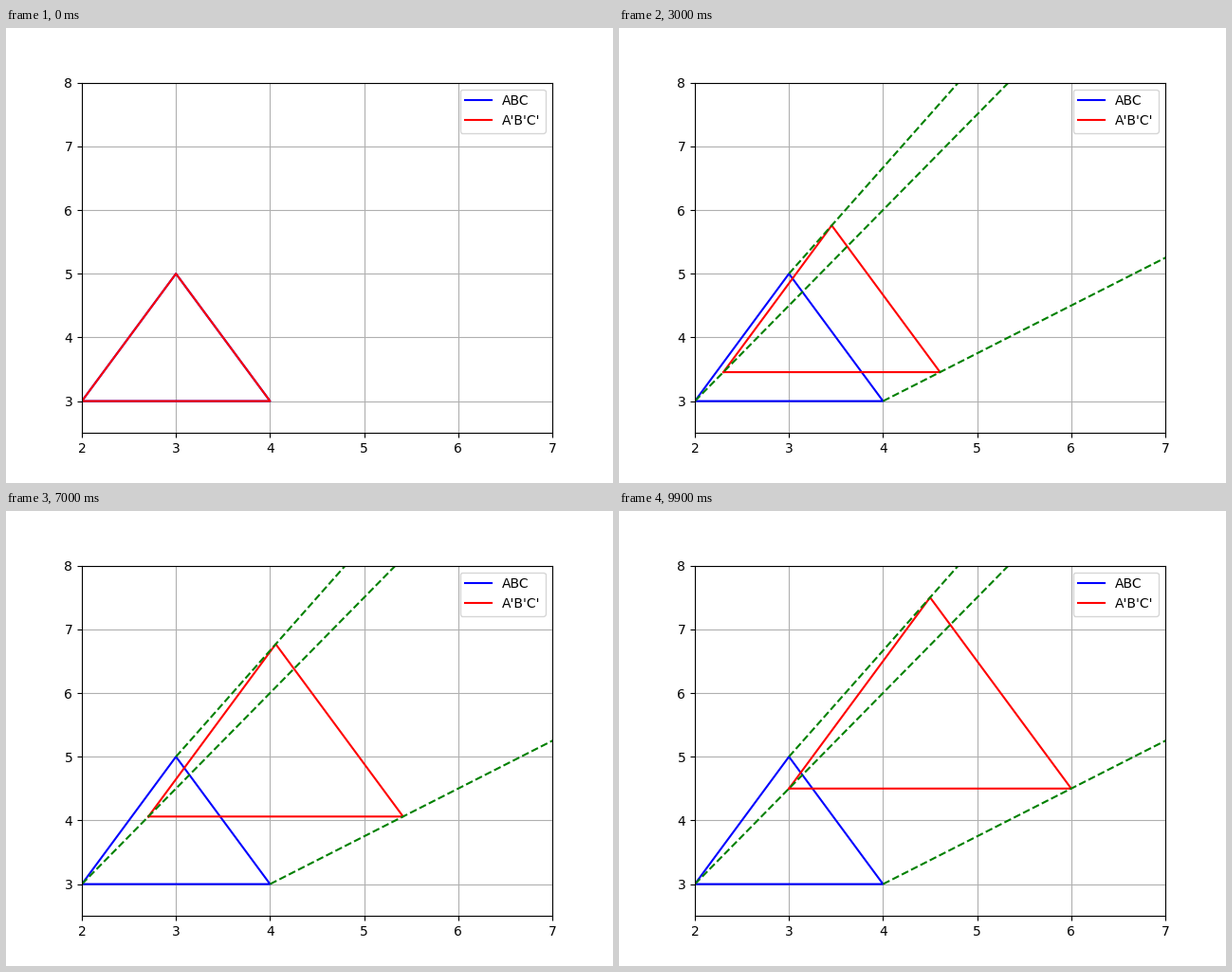
Write a matplotlib script that moves like this. It is 640x480 px and loops after 10000 ms.

```python
import numpy as np
import matplotlib.pyplot as plt
from matplotlib.animation import FuncAnimation

FRAMES = 100
INTERVAL = 100
MAX_SCALE = 1.5
RAY_REACH = 11  # ray length in units of a vertex's displacement

triangle = np.array([[2, 3], [3, 5], [4, 3]], dtype=float)
scales = np.linspace(1, MAX_SCALE, FRAMES)


def closed(points):
    return np.vstack([points, points[:1]]).T


fig, ax = plt.subplots(figsize=(6.4, 4.8), dpi=100)
ax.set_xlim(2, 7)
ax.set_ylim(2.5, 8)
ax.grid(True)

ax.plot(*closed(triangle), "b-", label="ABC")
image, = ax.plot(*closed(triangle), "r-", label="A'B'C'")
rays = [ax.plot([], [], "g--")[0] for _ in triangle]
ax.legend(loc="upper right")


def update(i):
    k = scales[i]
    image.set_data(*closed(k * triangle))
    for ray, p in zip(rays, triangle):
        end = p * (1 + RAY_REACH * (k - 1))
        ray.set_data([p[0], end[0]], [p[1], end[1]])
        ray.set_visible(i > 0)
    return [image, *rays]


anim = FuncAnimation(fig, update, frames=FRAMES, interval=INTERVAL,
                     repeat=True, repeat_delay=0)
plt.show()
```
